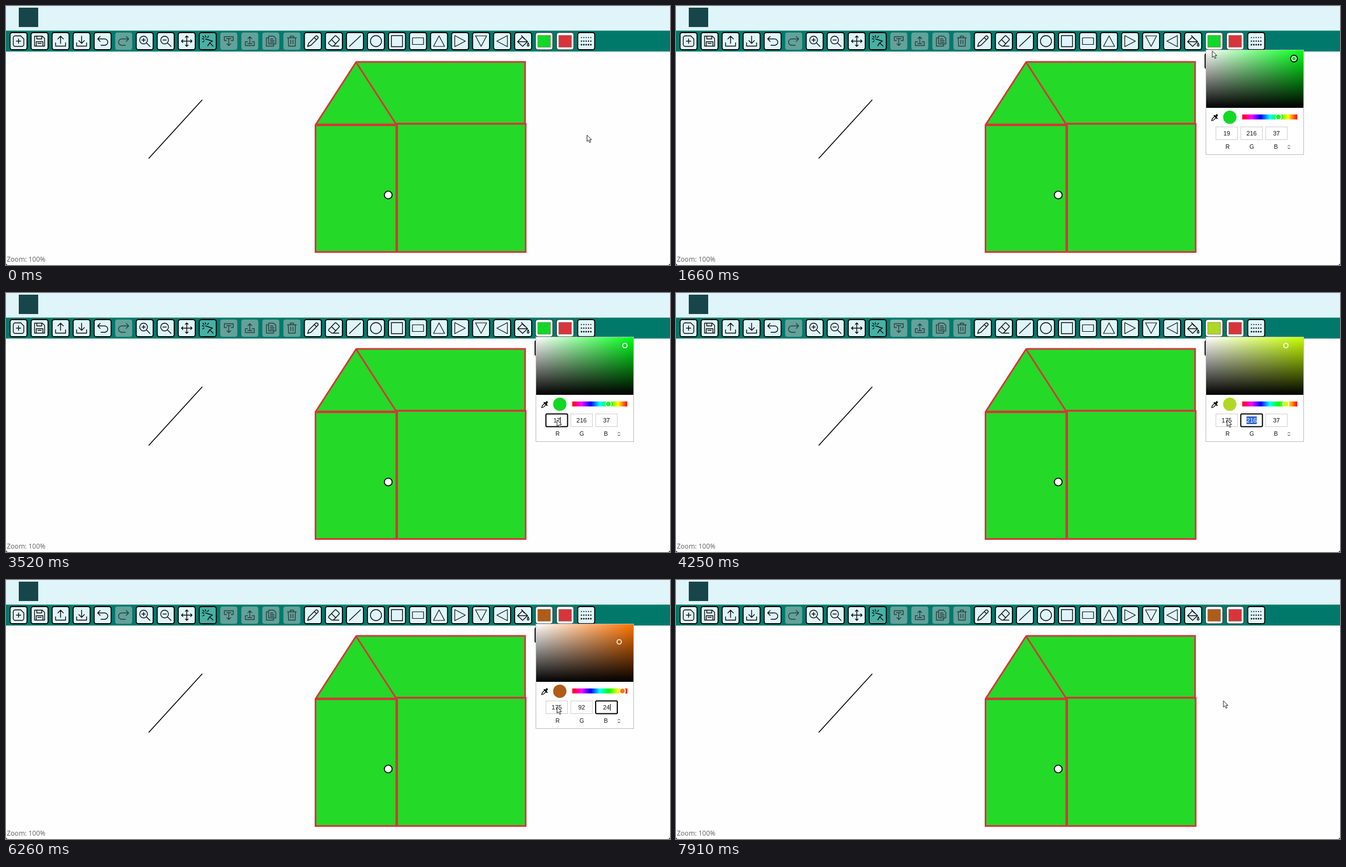
An HTML page that plays this animation: 1196x468 px, repeating every 8000 ms.

```html
<!DOCTYPE html>
<html lang="en">
<head>
<meta charset="utf-8">
<title>Drawing board</title>
<style>
html, body { margin: 0; width: 100%; height: 100%; overflow: hidden; background: #fefefe; }
svg { display: block; }
.ui { font: 12px "Noto Sans", "Open Sans", sans-serif; }
.field { font: 11px "Liberation Sans", Arial, sans-serif; text-anchor: middle; }
.icon { fill: none; stroke: #0b0b0b; stroke-width: 1.4; stroke-linejoin: round; stroke-linecap: round; }
</style>
</head>
<body>
<svg width="1196" height="468" viewBox="0 0 1196 468">
  <defs>
    <linearGradient id="white"><stop stop-color="#fff"/><stop offset="1" stop-color="#fff" stop-opacity="0"/></linearGradient>
    <linearGradient id="black" x2="0" y2="1"><stop stop-opacity="0"/><stop offset="1"/></linearGradient>
    <linearGradient id="hues"></linearGradient>
  </defs>
  <rect width="1196" height="46" fill="#e0f5f9"/>
  <rect x="23" y="3" width="35" height="35" fill="#17464a"/>
  <rect y="44.5" width="1196" height="37.8" fill="#00796b"/>
  <g id="tools"></g>

  <path d="M257 275.5L353.5 169.5" stroke="#000" stroke-width="1.6"/>
  <g fill="#24d928" stroke="#d8343b" stroke-width="3">
    <path d="M631 101H935V212.500H703"/>
    <path d="M704.500 213H936V444.500H704.500Z"/>
    <path d="M557.500 215.500H703V444.500H557.500Z"/>
    <path d="M630.500 101.500L558 214H703Z" stroke-linejoin="round"/>
  </g>
  <circle cx="688.5" cy="341.5" r="7" fill="#fff" stroke="#000" stroke-width="1.7"/>
  <text class="ui" x="1.5" y="462" fill="#6a6a6a">Zoom: 100%</text>
  <path d="M0 464Q0 468 4 468H0ZM1196 464Q1196 468 1192 468H1196Z"/>
  <g id="live"></g>
</svg>
<script>
const $ = id => document.getElementById(id);
const path = (d, attrs = '') => `<path d="${d}" ${attrs}/>`;
const rect = (x, y, w, h, attrs = '') => `<rect x="${x}" y="${y}" width="${w}" height="${h}" ${attrs}/>`;
const circle = (x, y, r, attrs = '') => `<circle cx="${x}" cy="${y}" r="${r}" ${attrs}/>`;

// Toolbar icons, each centred on 0,0
const lens = 'M5-2a7 7 0 1 1-14 0a7 7 0 1 1 14 0M3.500 3.500L9.500 9.500M-5-2H1';
const icons = [
  'M-9.500-6a3.500 3.500 0 0 1 3.500-3.500H4L9.500-4V6a3.500 3.500 0 0 1-3.500 3.500H-6A3.500 3.500 0 0 1-9.500 6ZM-4 0H4M0-4V4',
  'M-9-9H5L9-5V9H-9ZM-5-9V-4H4V-9M-6 9V1H6V9M-3 4H3',
  'M-9 3V9H9V3M0 4V-9M-5-4L0-9L5-4',
  'M-9 3V9H9V3M0-9V4M-5-1L0 4L5-1',
  'M-4.500-8.500L-9-4L-4.500 .5M-9-4H3.500a5.500 5.500 0 0 1 0 11.500H-3',
  'M4.500-8.500L9-4L4.500 .5M9-4H-3.500a5.500 5.500 0 0 0 0 11.500H3',
  lens + 'M-2-5V1',
  lens,
  'M-9.500 0H9.500M0-9.500V9.500M-7-2.500L-9.500 0L-7 2.500M7-2.500L9.500 0L7 2.500M-2.500-7L0-9.500L2.500-7M-2.500 7L0 9.500L2.500 7',
  'M-4-4L8.500 0L3.500 3L9.500 9M3.500 3L0 8.500ZM-4.500-10L-3.500-7M-10-4.500L-7-3.500M1.500-9L-.5-6.500M-9 1.500L-6.500-.5M-9-9L-6.500-6.500',
  'M-4-1H-8V-8H8V-1H4M0-4V8M-3.500 4.500L0 8L3.500 4.500M-4-4.500H4',
  'M-4 1H-8V8H8V1H4M0 4V-8M-3.500-4.500L0-8L3.500-4.500M-4 4.500H4',
  'M-4-9H5L9-5V5H-4ZM-4-6H-8V9H5V5M-1-4H4M-1-1H6M-1 2H6',
  'M-8-6H8M-3-6V-9H3V-6M-6.500-6L-6 9H6L6.500-6M-2-2V5M2-2V5',
  'M-9.500 9.500L-7.500 3.500L4.500-8.500Q6.500-10.500 8.500-8.500T8.500-4.500L-3.500 7.500ZM2.500-6.500L6.500-2.500',
  'M-9.500 2.500L1.500-9Q3-10.500 4.500-9L9-4.500Q10.500-3 9-1.500L-1 9H-4L-9.500 4.500ZM-4.500-3L3.500 5M-1 9H9',
  'M-10 9.500L10-9.500',
  'M10 0A10 10 0 1 1-10 0A10 10 0 1 1 10 0',
  'M-10-10H10V10H-10Z',
  'M-10-6H10V6H-10Z',
  'M0-9.500L10 9.500H-10Z',
  'M-9.500-10L9.500 0L-9.500 10Z',
  'M-10-9.500H10L0 9.500Z',
  'M9.500-10L-9.500 0L9.500 10Z',
  'M-10 1L-1-8L8 1L-1 9.500ZM-9 1H7M-3-10L2-4M9 3C11 7 11 9 9 9S7 7 9 3'
];
const off = [5, 10, 11, 12, 13], center = i => 22.6 + 37.87 * i;
const swatch = (i, color) => rect(center(i) - 11.5, 53, 23, 21.5, `fill="${color}" stroke="#777" stroke-width=".7"`);
const well = i => rect(center(i) - 15.5, 48, 31, 31, 'rx="4" fill="#fff" stroke="#222"');

const button = (i, content) => {
  const faded = off.includes(i);
  const style = faded ? 'fill="#62a29b"' : `fill="${i === 9 ? '#48b0a4' : '#e0f5f9'}" stroke="#000" stroke-width="1.8"`;
  return `<g transform="translate(${center(i)} 63.5)">${rect(-15.3, -15.5, 30.6, 31, 'rx="4" ' + style)}
    <g class="icon" ${faded ? 'opacity=".65"' : ''}>${content}</g></g>`;
};
const thin = i => i > 18 && i < 24 ? 'stroke-width="1.2"' : '';
const dots = [-6.5, 0, 6.5].map((y, i) =>
  path(`M-8.500 ${y}H9`, `stroke-width="${2 + i * .4}" stroke-dasharray="0 4.2"`)).join('');
$('tools').innerHTML = icons.map((d, i) => button(i, path(d, thin(i)))).join('')
  + well(25) + well(26) + swatch(26, '#d8343b') + button(27, dots);

$('hues').innerHTML = [0, 1, 2, 3, 4, 5, 6].map(i =>
  `<stop offset="${i / 6}" stop-color="hsl(${360 - i * 60} 100% 50%)"/>`).join('');

// start time, [R, G, B], focused field, whole value selected
const steps = [
  [0, [19, 216, 37], -1, false],
  [2350, [19, 216, 37], 0, true],
  [3180, [1, 216, 37], 0, false],
  [3520, [17, 216, 37], 0, false],
  [3790, [175, 216, 37], 0, false],
  [4250, [175, 216, 37], 1, true],
  [4620, [175, 9, 37], 1, false],
  [4990, [175, 92, 37], 1, false],
  [5450, [175, 92, 37], 2, true],
  [5890, [175, 92, 2], 2, false],
  [6260, [175, 92, 24], 2, false]
];

function hsv([r, g, b]) {
  const max = Math.max(r, g, b), d = max - Math.min(r, g, b);
  const h = max === r ? (g - b) / d : max === g ? 2 + (b - r) / d : 4 + (r - g) / d;
  return [(h * 60 + 360) % 360, d / max, max / 255];
}

function field(value, i, focused, selected) {
  const x = 992 + i * 44.8, half = String(value).length * 3.06;
  const border = focused ? 'stroke="#000" stroke-width="2" rx="2"' : 'stroke="#ccc"';
  return rect(x - 19.5, 218.5, 39, 23, 'fill="#fff" ' + border)
    + (focused && selected ? rect(x - half, 223, half * 2, 14, 'fill="#3067d0"') : '')
    + `<text class="field" x="${x}" y="234" fill="${focused && selected ? '#fff' : '#111'}">${value}</text>`
    + (focused && !selected ? rect(Math.round(x + half), 224, 1, 12) : '')
    + `<text class="field" x="${993.5 + i * 43.5}" y="258" fill="#111" style="font-size:10.5px">${'RGB'[i]}</text>`;
}

function picker(rgb, focus, selected) {
  const [h, s, v] = hsv(rgb), pure = `hsl(${h} 100% 50%)`;
  const x = 953.5 + s * 175, y = 79 + (1 - v) * 104.5;
  const area = fill => rect(955, 80, 175, 104, `fill="${fill}"`);
  return rect(954.5, 79.5, 176, 189, 'fill="#fff" stroke="#bbb"')
    + area(pure) + area('url(#white)') + area('url(#black)')
    + (focus < 0 ? circle(x, y, 6, 'fill="none" stroke="#111" stroke-width="2"') : '')
    + circle(x, y, 4, 'fill="none" stroke="#fff" stroke-width="1.6"')
    + path('M965 207L966 203.500L971 198.500L973.500 201L968.500 206Z', 'fill="#fff" stroke="#000" stroke-width="1.3"')
    + path('M969.500 198L974.500 203M972 200.500L974 198', 'stroke="#000" stroke-width="2.2" stroke-linecap="round"')
    + circle(974, 197.5, 2)
    + circle(997.5, 201, 12, `fill="rgb(${rgb})"`)
    + rect(1020, 196, 99, 9, 'fill="url(#hues)"')
    + circle(1117.3 - h * .2575, 200.5, 5.2, `fill="${pure}" stroke="#fff" stroke-width="1.8"`)
    + rgb.map((value, i) => field(value, i, i === focus, selected)).join('')
    + path('M1102 253.500L1104 251.500L1106 253.500M1102 256L1104 258L1106 256', 'fill="none" stroke="#222"');
}

const tooltip = opacity => `<g opacity="${opacity}">`
  + rect(953, 86, 56, 27, 'rx="3" fill="#b2ebf2" stroke="#000" stroke-width="1.8"')
  + '<text class="ui" x="957.5" y="104" style="font-size:11.5px">Fill Color</text></g>';

// Pointer positions advance in discrete steps
const glide = (t, start, gap, n, [x0, y0], [x1, y1]) => {
  const p = Math.min(n, Math.floor((t - start) / gap) + 1) / n, e = p * p * (3 - 2 * p);
  return [x0 + (x1 - x0) * e, y0 + (y1 - y0) * e];
};

function pointer(t) {
  if (t < 270) return [1046, 233];
  if (t < 1080) return glide(t, 270, 90, 9, [1046, 233], [966, 79]);
  if (t < 1510) return [963, 64];
  if (t < 2350) return glide(t, 1510, 83.4, 10, [963, 64], [987, 228]);
  if (t < 2530) return [987, 228];
  if (t < 2620) return [990, 229];
  return t < 7910 ? [992, 229] : [985.5, 218];
}

const arrow = 'M0 0V11.500L2.800 9L4.700 13.500L6.700 12.600L4.800 8.300H8.300Z';
const hand = 'M-1 10V1.500a1.300 1.300 0 0 1 2.600 0V6Q4 5 4.300 7Q6.500 6 6.700 8V11Q6.500 13 5.500 15.500H-1L-4.500 10.500Q-4 8-1 10Z';

function cursor(t) {
  const [x, y] = pointer(t), shape = t >= 1080 && t < 1593 ? hand : arrow;
  return path(shape, `transform="translate(${x + .5} ${y + .3})" fill="#fff" stroke="#222" stroke-linejoin="round"`);
}

let shown = '';
function draw(now) {
  const t = now % 8000;
  const [, rgb, focus, selected] = steps.findLast(s => s[0] <= t);
  const scene = swatch(25, `rgb(${rgb})`)
    + (t >= 1080 && t < 6880 ? tooltip(t < 1170 ? .5 : 1) : '')
    + (t >= 1510 && t < 6880 ? picker(rgb, focus, selected) : '')
    + cursor(t);
  if (scene !== shown) $('live').innerHTML = shown = scene;
  requestAnimationFrame(draw);
}
draw(0);
</script>
</body>
</html>
```
